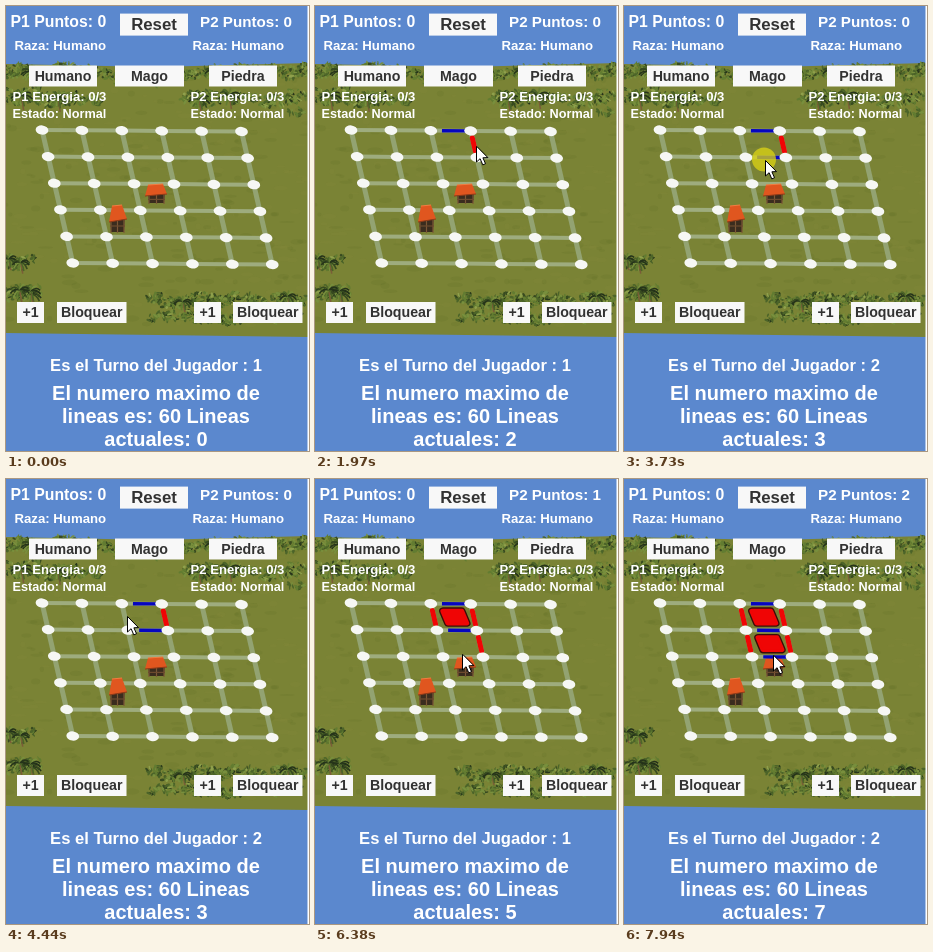
An HTML page with a canvas that plays this animation: 303x445 px, repeating every 8000 ms.

```html
<!DOCTYPE html>
<html lang="es">
<head>
<meta charset="utf-8">
<title>Juego de lineas</title>
<style>
html, body { margin: 0; width: 100%; height: 100%; overflow: hidden; background: #5b88ce; }
canvas { display: block; width: 303px; height: 445px; }
</style>
</head>
<body>
<canvas id="stage" width="303" height="445"></canvas>
<script>
const W = 303, H = 445, LOOP = 8000;
const ctx = document.getElementById('stage').getContext('2d');
const FONT = '"Liberation Sans", Arial, sans-serif';

let seed = 7;
function rnd() {
  seed = (seed * 16807) % 2147483647;
  return seed / 2147483647;
}
const between = (a, b) => a + rnd() * (b - a);
const mix = (a, b, f) => a.map((v, i) => v + (b[i] - v) * f);

// ---- helpers ----
function poly(g, points, fill) {
  g.beginPath();
  points.forEach(([x, y]) => g.lineTo(x, y));
  g.closePath();
  if (fill) { g.fillStyle = fill; g.fill(); }
}
function oval(g, x, y, rx, ry, turn, fill) {
  g.beginPath();
  g.ellipse(x, y, rx, ry, turn, 0, Math.PI * 2);
  g.fillStyle = fill;
  g.fill();
}
function bar(g, [x1, y1], [x2, y2], width, color, cap = 'butt') {
  g.beginPath();
  g.moveTo(x1, y1);
  g.lineTo(x2, y2);
  g.lineWidth = width;
  g.lineCap = cap;
  g.strokeStyle = color;
  g.stroke();
}
function label(g, text, x, y, size, align = 'left', color = '#fff') {
  g.font = `bold ${size}px ${FONT}`;
  g.textAlign = align;
  g.fillStyle = color;
  g.fillText(text, x, y);
}
function button(g, text, x, y, w, size = 14.2, h = 21, fill = '#f8f8f8') {
  g.fillStyle = fill;
  g.fillRect(x, y, w, h);
  label(g, text, x + w / 2, y + h / 2 + size * 0.35, size, 'center', '#323232');
}

// ---- scenery ----
const LEAVES = ['#25331a', '#374a20', '#4c6429', '#627c31', '#788f3d', '#8fa04c'];

function bush(g, x, y, r) {
  const count = Math.round(r * r * 0.5);
  for (let i = 0; i < count; i++) {
    const a = between(0, Math.PI * 2), d = r * Math.sqrt(rnd());
    const tone = Math.min(5, Math.floor(i / count * 3 + rnd() * 3));
    oval(g, x + Math.cos(a) * d * 1.3, y + Math.sin(a) * d * 0.8,
      between(1.2, 3.2), between(0.6, 1.5), rnd() * 3.1, LEAVES[tone]);
  }
}
function palm(g, x, y, r) {
  bar(g, [x, y], [x + 2, y + r * 1.3], 1.5, '#7a5c38');
  for (let i = 0; i < 11; i++) {
    const a = i / 11 * Math.PI * 2 + rnd() * 0.3;
    const dx = Math.cos(a) * r, dy = Math.sin(a) * r;
    g.beginPath();
    g.moveTo(x, y);
    g.quadraticCurveTo(x + dx * 0.6, y + dy * 0.5 - 3, x + dx, y + dy * 0.8 + 2);
    g.lineWidth = 1.6;
    g.strokeStyle = LEAVES[i % 5];
    g.stroke();
  }
}
// A hedge is a row of bushes with a few palms
function hedge(g, x0, x1, y, r, palms = 0) {
  for (let x = x0; x <= x1; x += r * 1.6) bush(g, x, y + between(-3, 3), r * between(0.7, 1.2));
  for (let i = 0; i < palms; i++) palm(g, between(x0, x1), y + between(-5, 5), r * 1.2);
}
function land(g) {
  g.fillStyle = '#5b88ce';
  g.fillRect(0, 0, W, H);
  poly(g, [[0, 58], [150, 61], [W, 57], [W, 331], [0, 327]], '#7a8335');
  for (let i = 0; i < 350; i++) {
    oval(g, rnd() * W, between(64, 322), between(2, 8), between(1, 3), 0,
      i % 2 ? 'rgba(84,98,32,.12)' : 'rgba(146,146,70,.10)');
  }
  hedge(g, 0, 108, 66, 9, 3);
  hedge(g, 182, W, 66, 9, 3);
  hedge(g, 112, 180, 73, 6);
  hedge(g, 0, 98, 92, 9, 2);
  hedge(g, 188, W, 92, 9, 2);
  hedge(g, 290, W, 109, 9);
  hedge(g, 0, 24, 256, 7, 2);
  hedge(g, 4, 30, 285, 8, 3);
  hedge(g, 150, W, 294, 7, 2);
  hedge(g, 146, 294, 311, 6);
  g.fillStyle = '#fff';
  g.fillRect(W - 1.5, 0, 1.5, H);
}

// ---- board ----
const node = (col, row) => [36 + col * 39.9 + row * 6.15, 124 + row * 26.6 + col * 0.3];
const ends = (dir, col, row) =>
  [node(col, row), dir === 'h' ? node(col + 1, row) : node(col, row + 1)];

function board(g) {
  for (let i = 0; i < 6; i++) {
    for (let j = 0; j < 5; j++) {
      bar(g, ...ends('h', j, i), 4, '#9eac7e');
      bar(g, ...ends('v', i, j), 5, '#93a372');
    }
  }
}
function dots(g) {
  for (let i = 0; i < 36; i++) oval(g, ...node(i % 6, Math.floor(i / 6)), 6.4, 4.6, 0.12, '#f6f7f4');
}
function house(g, x, y, w, h, roof) {
  poly(g, [[x, y], [x + w, y], [x + w - 1, y + h], [x + 1, y + h]], '#3a2c1e');
  for (let i = 0; i < 3; i++) {
    const px = x + 1 + i * (w - 2) / 2;
    bar(g, [px, y], [px, y + h + 1], 1.2, '#7c5836');
  }
  bar(g, [x, y + h * 0.6], [x + w, y + h * 0.6], 1.2, '#6c4a2e');
  poly(g, roof, '#e0561f');
  bar(g, roof[0], roof[1], 1.2, '#f27c40');
  bar(g, roof[2], roof[3], 1, '#8e3a18');
}

// ---- game rules ----
// Presses of the button: time, then the edge it marks, if any
const PRESSES = [
  [1260, 'h', 2, 0], [1800, 'v', 3, 0], [2490], [2880], [3430], [3670, 'h', 2, 1],
  [4590, 'v', 2, 0], [5520, 'v', 3, 1], [6230], [6700, 'h', 2, 2], [7620, 'v', 2, 1]
];
const RING = 150;

// Players take turns; whoever closes a cell scores and plays again
function play(t) {
  const game = { turn: 1, points: [0, 0], edges: [], cells: [] };
  const marked = new Set();
  const closed = (c, r) =>
    [['h', c, r], ['h', c, r + 1], ['v', c, r], ['v', c + 1, r]].every(e => marked.has(e.join()));

  PRESSES.filter(([time, dir]) => dir && time <= t).forEach(([, ...edge]) => {
    const [dir, c, r] = edge;
    marked.add(edge.join());
    game.edges.push(edge);
    const beside = [[c, r], dir === 'h' ? [c, r - 1] : [c - 1, r]];
    const won = beside.filter(cell => closed(...cell));
    game.cells.push(...won);
    game.points[game.turn - 1] += won.length;
    if (!won.length) game.turn = 3 - game.turn;
  });
  return game;
}

const RED = '#f00505';
function mark(g, dir, col, row) {
  const [a, b] = ends(dir, col, row);
  if (dir === 'h') bar(g, mix(a, b, 0.28), mix(a, b, 0.88), 3.4, '#0606c0');
  else bar(g, mix(a, b, 0.26), mix(a, b, 0.77), 5, RED, 'round');
}
function cell(g, col, row) {
  const [x, y] = node(col, row);
  g.lineJoin = 'round';
  poly(g, [[x + 12, y + 7.5], [x + 31, y + 7.5], [x + 36, y + 19.5], [x + 17, y + 19.5]]);
  [[7.5, '#3a0d08'], [4.8, RED]].forEach(([width, color]) => {
    g.lineWidth = width;
    g.strokeStyle = color;
    g.stroke();
  });
  g.fillStyle = RED;
  g.fill();
}

// ---- pointer ----
// Hops: start, end, place reached
const HOPS = [
  [30, 880, 143, 127], [880, 1110, 142, 125], [1430, 1800, 160, 138], [1850, 1960, 161, 140],
  [2050, 2340, 148, 149], [2560, 2730, 141, 150], [3040, 3270, 141, 154],
  [4150, 4440, 121, 137], [4830, 5290, 163, 166], [5610, 5910, 147, 175],
  [6500, 6700, 147, 178], [7160, 7400, 126, 165], [7780, 7940, 149, 176]
];
const ease = f => f * f * (3 - 2 * f);

function pointerAt(t) {
  let at = [250, 448];
  HOPS.forEach(([from, to, ...goal]) => {
    if (t > from) at = mix(at, goal, ease(Math.min(1, (t - from) / (to - from))));
  });
  return at;
}
function arrow(g, x, y) {
  g.save();
  g.translate(Math.round(x) + 0.5, Math.round(y) + 0.5);
  g.lineJoin = 'miter';
  poly(g, [[0, 0], [0, 15.5], [3.6, 12.2], [6.3, 18.4], [9, 17.2], [6.4, 11.3], [11, 11.1]], '#fff');
  g.lineWidth = 1;
  g.strokeStyle = '#000';
  g.stroke();
  g.restore();
}

// ---- panel ----
function panel(g, { turn, points, edges }) {
  label(g, `P1 Puntos: ${points[0]}`, 4.5, 21.3, 15.8);
  label(g, `P2 Puntos: ${points[1]}`, 194, 20.5, 15.2);
  [8.5, 186.5].forEach(x => label(g, 'Raza: Humano', x, 43.5, 13.2));
  [6.5, 184.5].forEach((x, i) => {
    label(g, `P${i + 1} Energia: 0/3`, x, 95.3, 13.1);
    label(g, 'Estado: Normal', x, 111.8, 12.7);
  });
  button(g, 'Reset', 114, 7.6, 68, 16.8, 22);
  button(g, 'Humano', 23, 59.5, 68);
  button(g, 'Mago', 109, 59.5, 69);
  button(g, 'Piedra', 203, 59.5, 68);
  [[11, 51], [188, 227]].forEach(([plus, block]) => {
    button(g, '+1', plus, 296, 27);
    button(g, 'Bloquear', block, 296, 69.5);
  });
  label(g, `Es el Turno del Jugador : ${turn}`, 150, 364.5, 16.6, 'center');
  ['El numero maximo de', 'lineas es: 60 Lineas', `actuales: ${edges.length}`]
    .forEach((line, i) => label(g, line, 150, 394 + i * 22.75, 20, 'center'));
}

// ---- fixed picture, drawn once ----
const back = document.createElement('canvas');
back.width = W;
back.height = H;
const bg = back.getContext('2d');
land(bg);
board(bg);
house(bg, 142, 188, 17, 9, [[142, 179], [157, 178], [161, 188], [139, 190]]);
house(bg, 104, 211, 15, 15, [[106, 200], [116, 199], [121, 213], [103, 216]]);

function draw(t) {
  const game = play(t);
  const [x, y] = pointerAt(t);
  ctx.drawImage(back, 0, 0);
  game.edges.forEach(e => mark(ctx, ...e));
  game.cells.forEach(c => cell(ctx, ...c));
  dots(ctx);
  panel(ctx, game);
  if (PRESSES.some(([time]) => t >= time && t < time + RING)) {
    oval(ctx, x - 1, y - 0.5, 12, 12, 0, 'rgba(220,212,20,.76)');
  }
  arrow(ctx, x, y);
}

const start = performance.now();
function tick() {
  draw((performance.now() - start) % LOOP);
  requestAnimationFrame(tick);
}
tick();
</script>
</body>
</html>
```
